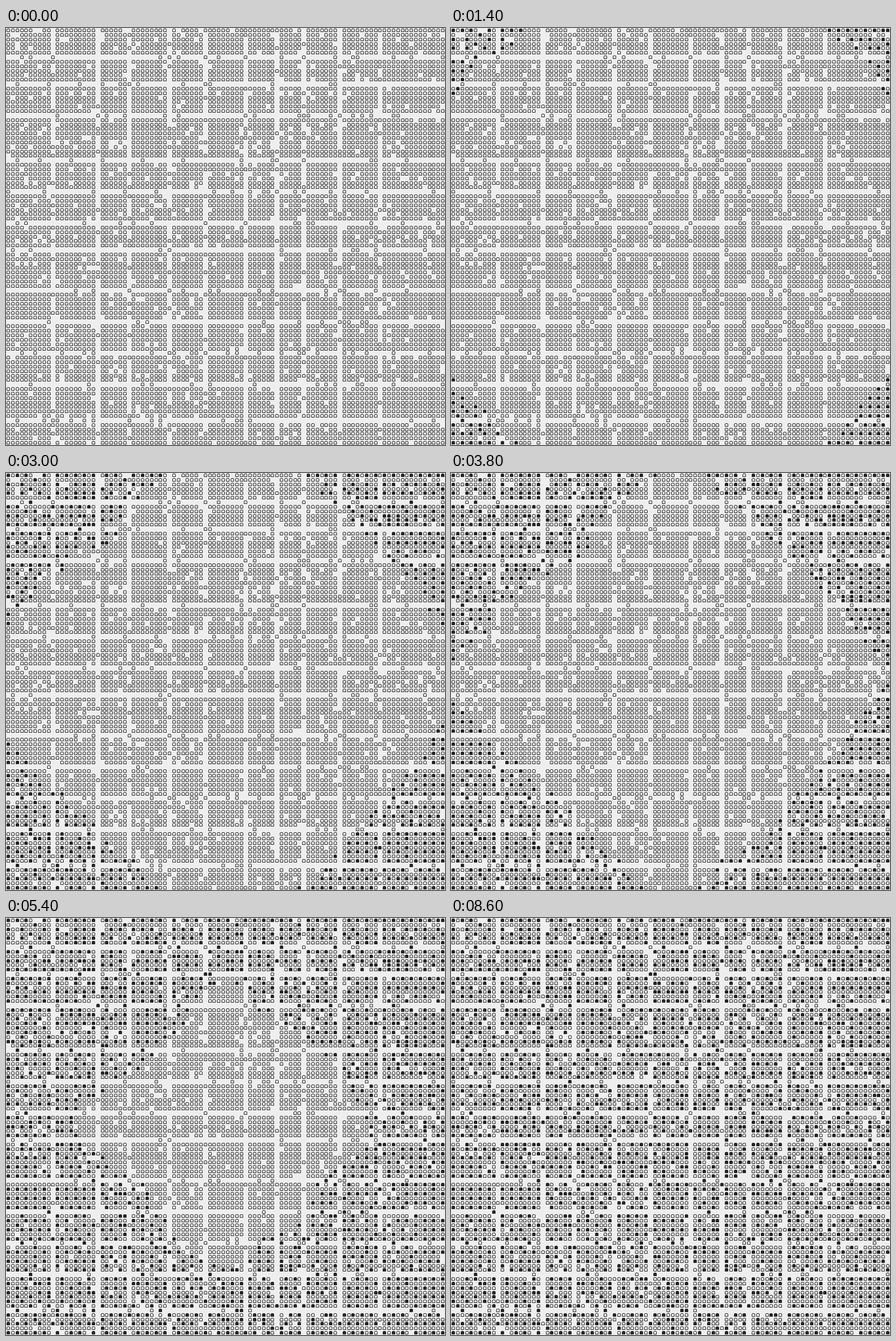
Animation, 768 px wide and 729 px high, one loop 8.7 s. Source, as an HTML page with a canvas:

```html
<!DOCTYPE html>
<html>
<head>
<meta charset="utf-8">
<title>Seats</title>
<style>
  html, body { margin: 0; width: 100%; height: 100%; overflow: hidden; background: #eee; }
  canvas { display: block; }
</style>
</head>
<body>
<canvas id="stage" width="768" height="729"></canvas>
<script>
const WIDTH = 768, HEIGHT = 729;
const COLS = 98, ROWS = 93;
const STEP_MS = 100, STEPS = 87;
const BACK = '#eeeeee', INK = '#262626';

// Aisles split the floor into blocks.
const aisleCols = [10, 20, 27, 36, 44, 53, 60, 66, 74, 83];
const aisleRows = [6, 12, 19, 29, 36, 43, 49, 58, 65, 72, 79, 87];

let seed = 20;
function random() {
  seed = (Math.imul(seed, 1664525) + 1013904223) >>> 0;
  return seed / 4294967296;
}

function seatChance(col, row) {
  const inCorner = col % (COLS - 1) === 0 && row % (ROWS - 1) === 0;
  if (inCorner) return 1;
  if (aisleRows.includes(row)) return 0.16;
  if (aisleCols.includes(col)) return 0.2;
  return 0.945;
}

const seats = [];
const seatAt = new Map();
for (let row = 0; row < ROWS; row++) {
  for (let col = 0; col < COLS; col++) {
    if (random() >= seatChance(col, row)) continue;
    seatAt.set(row * COLS + col, seats.length);
    seats.push({ col, row });
  }
}

// The first seat in sight in each of the eight directions.
function visibleFrom({ col, row }) {
  const found = [];
  for (let dy = -1; dy <= 1; dy++) {
    for (let dx = -1; dx <= 1; dx++) {
      if (!dx && !dy) continue;
      let x = col + dx, y = row + dy;
      while (x >= 0 && x < COLS && y >= 0 && y < ROWS) {
        const index = seatAt.get(y * COLS + x);
        if (index !== undefined) { found.push(index); break; }
        x += dx;
        y += dy;
      }
    }
  }
  return found;
}
const views = seats.map(visibleFrom);

// People sit where they see nobody and leave when they see five or more.
function nextRound(taken) {
  return taken.map((sitting, i) => {
    let count = 0;
    for (const j of views[i]) count += taken[j];
    return sitting ? +(count < 5) : +(count === 0);
  });
}

const rounds = [new Uint8Array(seats.length)];
while (rounds.length < STEPS) rounds.push(nextRound(rounds[rounds.length - 1]));

function addSeat(path, { col, row }) {
  const x = Math.round(col * WIDTH / COLS) + 1.5;
  const y = Math.round(row * HEIGHT / ROWS) + 1.5;
  path.moveTo(x, y + 5);
  path.lineTo(x, y + 1.5);
  path.quadraticCurveTo(x, y, x + 1.5, y);
  path.lineTo(x + 3.5, y);
  path.quadraticCurveTo(x + 5, y, x + 5, y + 1.5);
  path.lineTo(x + 5, y + 5);
  path.closePath();
}

const outlines = new Path2D();
seats.forEach(seat => addSeat(outlines, seat));
const ctx = document.getElementById('stage').getContext('2d');

function draw(taken) {
  ctx.fillStyle = BACK;
  ctx.fillRect(0, 0, WIDTH, HEIGHT);
  const filled = new Path2D();
  seats.forEach((seat, i) => { if (taken[i]) addSeat(filled, seat); });
  ctx.fillStyle = ctx.strokeStyle = INK;
  ctx.lineWidth = 1;
  ctx.fill(filled);
  ctx.stroke(outlines);
}

let shown = -1;
function tick() {
  const step = Math.floor(performance.now() / STEP_MS) % STEPS;
  if (step !== shown) draw(rounds[shown = step]);
  requestAnimationFrame(tick);
}
tick();
</script>
</body>
</html>
```
